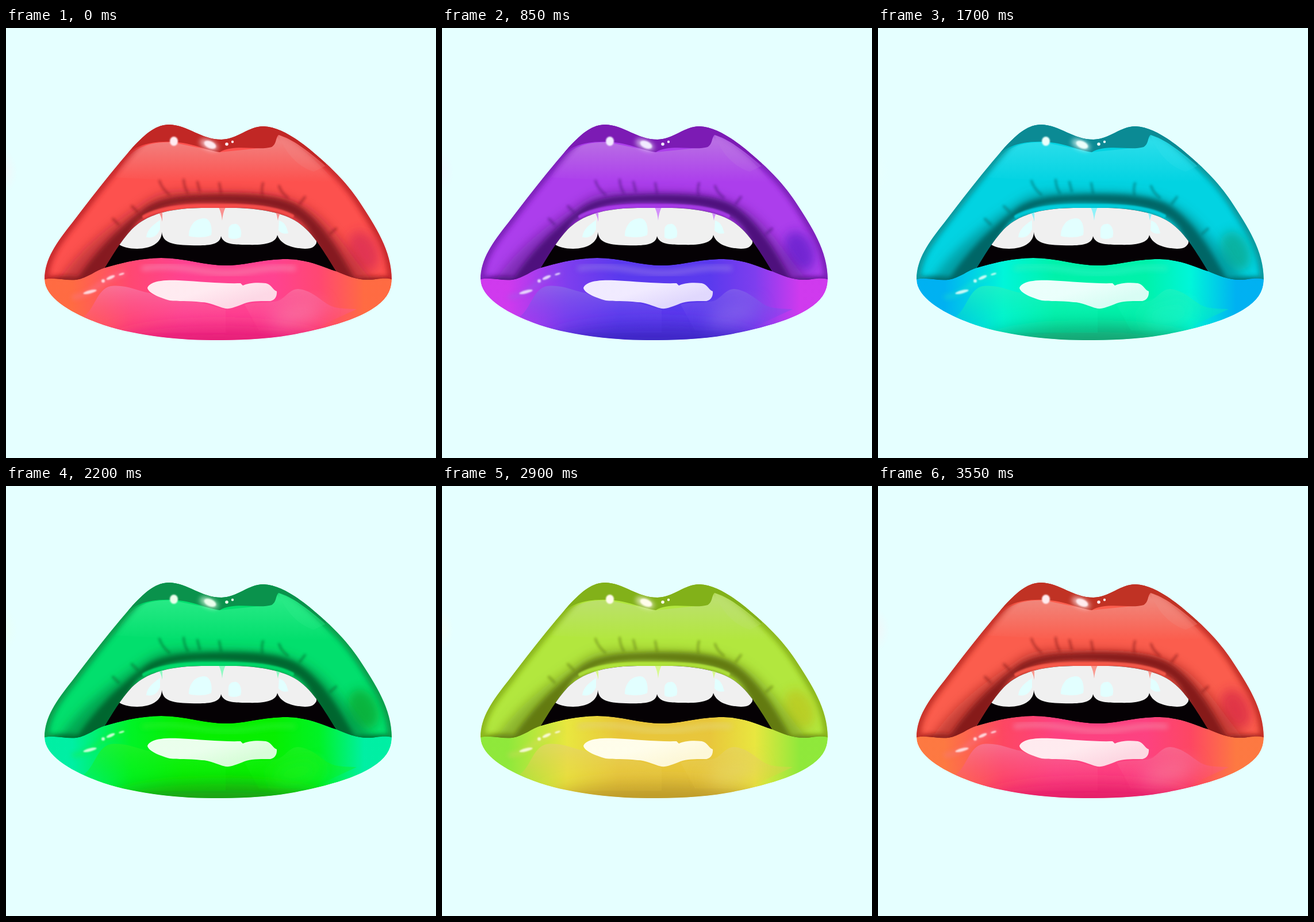
Animation of 748x748 px, one loop 3600 ms. Source, as an HTML page:

```html
<!DOCTYPE html>
<html lang="en">
<head>
<meta charset="utf-8">
<title>Lips</title>
<style>
  @property --h { syntax: "<number>"; inherits: true; initial-value: 0; }
  @property --k { syntax: "<number>"; inherits: true; initial-value: 0; }
  @property --s { syntax: "<number>"; inherits: true; initial-value: 1; }
  @property --l { syntax: "<number>"; inherits: true; initial-value: 1; }

  html, body { margin: 0; width: 100%; height: 100%; overflow: hidden; background: #e5ffff; }

  /* --r and --p: hues of the upper and lower lip; --m: softer lightness; --d: saturation of darks */
  svg {
    display: block; width: 100vw; height: 100vh;
    animation: hue 3.6s steps(72) infinite, tone 3.6s linear infinite;
    --r: calc(var(--h) + var(--k));
    --p: calc(var(--h) + var(--k) * .4);
    --m: calc(.2 + .8 * var(--l));
    --d: calc(128% - 60% * var(--l));
    --main: hsl(calc(var(--r) + 1) calc(98% * var(--s)) calc(65% * var(--l)));
    --light: hsl(calc(var(--r) + 1) calc(82% * var(--s)) calc(72% * var(--m)));
    --band: hsl(calc(var(--r) + 1) var(--d) calc(45% * var(--l)));
    --edge: hsl(calc(var(--r) - 1) var(--d) calc(44% * var(--l)));
    --shade: hsl(calc(var(--r) - 4) var(--d) calc(30% * var(--l)));
    --blush: hsl(calc(var(--r) + 345) var(--d) calc(50% * var(--l)));
    --gum: hsl(calc(var(--r) + 1) 90% 77%);
    --corner: hsl(calc(var(--r) + 13) calc(100% * var(--s)) calc(63% * var(--m)));
    --rose: hsl(calc(var(--p) + 346) calc(100% * var(--s)) calc(64% * var(--m)));
    --pink: hsl(calc(var(--p) + 335) calc(100% * var(--s)) calc(63% * var(--m)));
    --pale: hsl(calc(var(--p) + 338) calc(88% * var(--s)) calc(73% * var(--m)));
    --deep: hsl(calc(var(--p) + 333) calc(80% * var(--s)) calc(51% * var(--l)));
    --gloss: hsl(calc(var(--p) + 342) 100% 96%);
    --tint: hsl(calc(var(--p) + 338) 90% 92%);
  }

  @keyframes hue { to { --h: -360; } }
  @keyframes tone {
    0%, 100% { --k: 0; --s: 1; --l: 1; }
    23.6% { --k: 2; --s: .84; --l: .9; }
    47.2% { --k: -7; --s: 1; --l: .69; }
    61.1% { --k: 8; --s: 1; --l: .68; }
    72.2% { --k: 21; --s: .76; --l: .85; }
    87.5% { --k: -3; --s: .82; --l: .91; }
  }

  .main { fill: var(--main); }
  .band { fill: var(--band); }
  .shade { fill: var(--shade); }
  .blush { fill: var(--blush); }
  .gum { fill: var(--gum); }
  .pale { fill: var(--pale); }
  .deep { fill: var(--deep); }
  .gloss { fill: var(--gloss); }
  .line { fill: none; stroke-linecap: round; stroke-linejoin: round; }
</style>
</head>
<body>
<svg viewBox="0 0 748 748">
  <defs>
    <filter id="b1" x="-50%" y="-50%" width="200%" height="200%"><feGaussianBlur stdDeviation="1.2"/></filter>
    <filter id="b2" x="-50%" y="-50%" width="200%" height="200%"><feGaussianBlur stdDeviation="2"/></filter>
    <filter id="b4" x="-50%" y="-50%" width="200%" height="200%"><feGaussianBlur stdDeviation="4"/></filter>
    <filter id="b9" x="-50%" y="-50%" width="200%" height="200%"><feGaussianBlur stdDeviation="9"/></filter>
    <filter id="b16" x="-50%" y="-50%" width="200%" height="200%"><feGaussianBlur stdDeviation="16"/></filter>

    <linearGradient id="lower" gradientUnits="userSpaceOnUse" x1="67" y1="440" x2="671" y2="440">
      <stop offset=".08" style="stop-color:var(--corner)"/>
      <stop offset=".25" style="stop-color:var(--rose)"/>
      <stop offset=".4" style="stop-color:var(--pink)"/>
      <stop offset=".66" style="stop-color:var(--pink)"/>
      <stop offset=".79" style="stop-color:var(--rose)"/>
      <stop offset=".92" style="stop-color:var(--corner)"/>
    </linearGradient>
    <linearGradient id="sheen" gradientUnits="userSpaceOnUse" x1="0" y1="190" x2="0" y2="268">
      <stop offset=".1" style="stop-color:var(--light)"/>
      <stop offset="1" style="stop-color:var(--light);stop-opacity:0"/>
    </linearGradient>
    <linearGradient id="bump" gradientUnits="userSpaceOnUse" x1="0" y1="448" x2="0" y2="520">
      <stop offset="0" style="stop-color:var(--pale);stop-opacity:.7"/>
      <stop offset="1" style="stop-color:var(--pink);stop-opacity:.15"/>
    </linearGradient>
    <linearGradient id="shine" gradientUnits="userSpaceOnUse" x1="330" y1="445" x2="345" y2="495">
      <stop offset=".3" style="stop-color:var(--gloss)"/>
      <stop offset="1" style="stop-color:var(--tint)"/>
    </linearGradient>
    <radialGradient id="speck">
      <stop offset="0" style="stop-color:var(--gloss);stop-opacity:.35"/>
      <stop offset="1" style="stop-color:var(--gloss);stop-opacity:0"/>
    </radialGradient>

    <path id="top" d="M67 437C67 402 88 373 115 339C150 293 184 249 220 208C240 187 259 168 284 168C317 169 339 194 375 194C404 193 421 171 448 171C480 172 517 200 547 227C575 251 598 277 614 301C643 345 671 388 671 437L630 446L122 446Z"/>
    <path id="bottom" d="M67 437C85 433 103 440 122 438C142 435 157 421 172 417C202 408 235 400 270 400C310 400 345 413 383 413C419 413 443 402 490 402C529 403 551 416 574 423C594 431 608 438 630 438C645 438 655 433 671 437C671 461 657 476 640 487C609 509 550 524 495 534C449 542 403 543 358 543C291 543 213 533 159 513C119 498 67 471 67 437Z"/>
    <path id="mouth" d="M172 417C184 398 199 371 219 350C247 323 285 314 340 313L400 313C442 314 484 322 506 337C534 355 554 391 574 423C545 450 200 450 172 417Z"/>
    <clipPath id="inTop"><use href="#top"/></clipPath>
    <clipPath id="inBottom"><use href="#bottom"/></clipPath>
    <clipPath id="inMouth"><use href="#mouth"/></clipPath>
  </defs>

  <ellipse cx="0" cy="250" rx="20" ry="36" fill="url(#speck)"/>

  <g clip-path="url(#inTop)">
    <use href="#top" class="main"/>
    <path fill="url(#sheen)" d="M190 260C205 225 228 196 290 199L372 216L462 207L474 186C505 200 550 235 580 280Z"/>
    <use href="#top" class="line" filter="url(#b4)" opacity=".85" style="stroke:var(--edge);stroke-width:15"/>
    <path class="band" d="M186 248C203 218 230 195 290 198C325 200 345 212 372 216C397 201 440 214 462 207C471 202 469 190 474 186C501 194 530 218 556 240L560 160H180Z"/>
    <path fill="url(#sheen)" opacity=".8" d="M474 186C501 194 530 218 556 240L535 250C505 240 485 215 474 186Z"/>

    <ellipse class="blush" cx="622" cy="388" rx="24" ry="36" transform="rotate(-25 622 388)" filter="url(#b9)" opacity=".7"/>
    <g filter="url(#b9)">
      <path class="shade" opacity=".45" d="M85 452C125 385 185 342 236 308C272 280 300 284 375 285C445 285 482 290 520 310C570 340 600 400 645 450L560 455L510 330L380 306L280 307L210 350L165 450Z"/>
    </g>
    <g filter="url(#b4)">
      <path class="shade" opacity=".92" d="M118 445C145 402 187 354 236 318C268 293 300 291 375 289C445 289 481 294 508 309C553 339 584 395 612 445H575L525 348C498 312 440 306 375 304C300 301 265 311 229 336L172 430Z"/>
      <path class="shade" opacity=".7" d="M72 440Q100 427 130 434L140 450H72ZM590 440Q630 428 668 437V447H590Z"/>
    </g>
    <g class="line" filter="url(#b2)" opacity=".5" style="stroke:var(--shade);stroke-width:4">
      <path d="M267 266Q271 279 284 290M309 264Q310 277 316 287M333 268L337 284M371 270L374 287M447 270Q444 279 446 290M475 275Q479 287 490 295M520 294L511 306M186 332L196 342M219 310L229 320M574 349L564 358"/>
    </g>
    <path class="line" filter="url(#b1)" opacity=".85" style="stroke:var(--main);stroke-width:6" d="M240 328C262 315 295 310 340 309H400C442 310 478 316 498 327"/>
  </g>

  <g class="gloss">
    <ellipse cx="292" cy="197" rx="7" ry="8" filter="url(#b1)"/>
    <ellipse cx="353" cy="203" rx="17" ry="8" transform="rotate(24 353 203)" filter="url(#b4)" opacity=".7"/>
    <ellipse cx="355" cy="203" rx="11" ry="6" transform="rotate(24 355 203)" filter="url(#b1)"/>
    <circle cx="384" cy="202" r="2.8"/>
    <circle cx="394" cy="198" r="2.2"/>
  </g>

  <use href="#mouth" fill="#050104"/>
  <g clip-path="url(#inMouth)">
    <path fill="#f0f0f0" d="M195 375C204 384 230 386 245 382C262 378 271 368 271 355C273 372 285 377 320 378C350 379 372 378 374 362C378 376 395 377 420 377C450 378 470 374 472 360C478 378 500 383 520 384C533 384 537 380 540 374V305H195Z"/>
    <path class="gum" d="M370 312H382Q377 322 376 335Q375 322 370 312ZM263 318L272 316V337Q270 325 263 318ZM468 318L478 322Q474 326 473 335Q472 326 468 318Z"/>
    <path fill="#e2ffff" d="M318 362C318 345 328 331 345 331C357 332 359 350 357 360C346 366 326 364 318 362ZM387 352C387 342 395 340 401 341C408 344 411 355 408 364C400 368 391 368 387 364ZM244 364C246 350 255 343 268 334V350C263 362 255 366 244 364ZM475 335C485 338 488 345 491 357C484 359 478 357 474 352Z"/>
  </g>

  <g clip-path="url(#inBottom)">
    <use href="#bottom" fill="url(#lower)"/>
    <ellipse class="deep" cx="370" cy="552" rx="190" ry="34" filter="url(#b16)"/>
    <path fill="url(#bump)" d="M135 502C154 490 158 454 182 449C211 446 226 457 250 461C280 477 310 474 340 478L382 490V530H200Z"/>
    <path fill="url(#bump)" d="M415 481C440 475 470 480 480 471C490 463 497 454 508 454C531 456 545 472 562 482C575 489 592 488 610 489L530 526H440Z"/>
    <ellipse class="pale" cx="505" cy="498" rx="48" ry="17" transform="rotate(-14 505 498)" filter="url(#b16)" opacity=".7"/>
    <path class="line" filter="url(#b4)" opacity=".65" style="stroke:var(--pale);stroke-width:10" d="M240 418C300 409 340 427 385 426C430 426 450 414 500 418"/>
    <path class="line" filter="url(#b4)" opacity=".35" style="stroke:var(--pale);stroke-width:8" d="M118 468C150 466 158 440 205 427"/>
    <path fill="url(#shine)" d="M246 452C250 440 275 438 300 439C340 441 375 445 408 444L412 448C420 444 435 442 452 444C463 447 463 455 471 458C472 468 466 476 455 475C440 475 425 475 415 479C400 485 390 489 382 488C365 484 355 477 340 477C315 474 300 476 285 474C270 470 248 462 246 452Z"/>
    <g class="gloss" filter="url(#b1)" opacity=".85">
      <ellipse cx="182" cy="434" rx="8" ry="2.6" transform="rotate(-24 182 434)"/>
      <ellipse cx="201" cy="428" rx="5" ry="1.6" transform="rotate(-18 201 428)"/>
      <circle cx="169" cy="440" r="3"/>
      <ellipse cx="146" cy="459" rx="12" ry="2.8" transform="rotate(-14 146 459)"/>
    </g>
  </g>
</svg>
</body>
</html>
```
